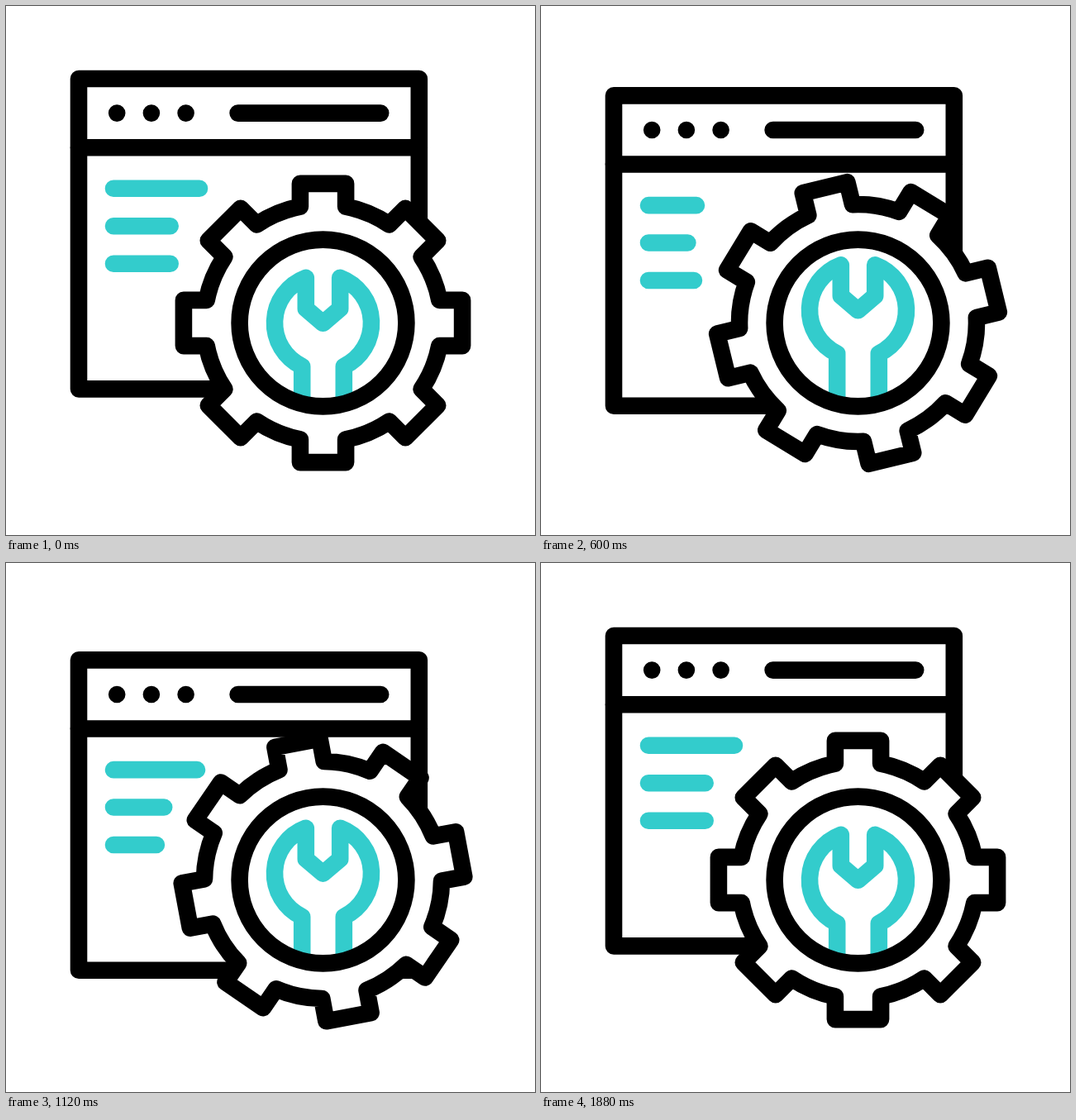
Recreate the animation shown at these times as an HTML page. Size 640x640 px, loop 2000 ms.

```html
<!DOCTYPE html>
<html lang="en">
<head>
<meta charset="utf-8">
<title>Web maintenance</title>
<style>
html, body { margin: 0; width: 100%; height: 100%; overflow: hidden; background: #fff; }
svg { display: block; width: 100%; height: 100%; }
g, path, rect, circle { stroke-width: 20.6; stroke-linecap: round; stroke-linejoin: round; }
.ink { stroke: #000; fill: #fff; }
.teal { stroke: #33cccc; fill: none; }
</style>
</head>
<body>
<svg viewBox="0 0 640 640">
  <g id="page">
    <rect class="ink" x="88" y="88" width="411.8" height="375.4"/>
    <path class="ink" d="M88 171.2H499.8M280.6 129.6H453.2M134.2 129.6h0M175.9 129.6h0M217.6 129.6h0"/>
    <path class="teal" id="lines"/>
  </g>
  <path class="ink" id="gear"/>
  <path class="teal" id="wrench"/>
  <circle class="ink" cx="383.5" cy="383.5" r="100.9" style="fill:none"/>
</svg>
<script>
const $ = id => document.getElementById(id);
const LOOP = 2000, STEP = 40, LAST = 1880;
const CENTER = 383.5;

// cubic-bezier(.5, 0, .5, 1), solved by bisection
function ease(x) {
  if (x <= 0) return 0;
  if (x >= 1) return 1;
  let lo = 0, hi = 1, s;
  for (let i = 0; i < 24; i++) {
    s = (lo + hi) / 2;
    if (1.5 * s * (1 - s) + s ** 3 < x) lo = s; else hi = s;
  }
  return s * s * (3 - 2 * s);
}

const ramp = (t, from, to) => ease((t - from) / (to - from));
const swing = (t, start, peak, end) => ramp(t, start, peak) - ramp(t, peak, end);

function gearPath(teeth, half, top, radius) {
  const root = Math.sqrt(radius ** 2 - half ** 2);
  let d = '';
  for (let i = 0; i < teeth; i++) {
    const a = i * 2 * Math.PI / teeth, c = Math.cos(a), s = Math.sin(a);
    const at = (x, y) => `${CENTER + x * c - y * s} ${CENTER + x * s + y * c}`;
    d += (i ? `A${radius} ${radius} 0 0 1 ` : 'M') + at(-half, -root) +
      `L${at(-half, -top)}L${at(half, -top)}L${at(half, -root)}`;
  }
  return d + `A${radius} ${radius} 0 0 1 ${CENTER - half} ${CENTER - root}Z`;
}

// The head slides while the handle stays tucked behind the ring.
function wrenchPath(dy) {
  const y = v => v + dy;
  return `M358.2 480V${y(436)}A58.3 58.3 0 0 1 362.8 ${y(328.8)}V${y(366.2)}` +
    `L383.5 ${y(383.8)}L404.2 ${y(366.2)}V${y(328.8)}` +
    `A58.3 58.3 0 0 1 408.8 ${y(436)}V480`;
}

const rows = [
  { y: 220.8, end: 234, shrink: 46.3 },
  { y: 266.2, end: 198.7, shrink: 24.3 },
  { y: 311.7, end: 198.7, shrink: 24.3 }
];

function draw(t) {
  $('page').setAttribute('transform', `translate(0 ${30.5 * swing(t, 60, 980, 1880)})`);
  $('lines').setAttribute('d', rows.map((row, i) => {
    const start = 40 + 120 * i;
    const end = row.end - row.shrink * swing(t, start, start + 600, start + 1200);
    return `M130 ${row.y}H${end}`;
  }).join(''));
  $('gear').setAttribute('transform', `rotate(${180 * ramp(t, 40, 1840)} ${CENTER} ${CENTER})`);
  $('wrench').setAttribute('d', wrenchPath(-17.7 * swing(t, 110, 780, 1430)));
}

$('gear').setAttribute('d', gearPath(8, 27.6, 168.6, 143.5));
const begin = performance.now();
function tick() {
  const t = (performance.now() - begin) % LOOP;
  draw(Math.min(LAST, Math.floor(t / STEP) * STEP));
  requestAnimationFrame(tick);
}
tick();
</script>
</body>
</html>
```
